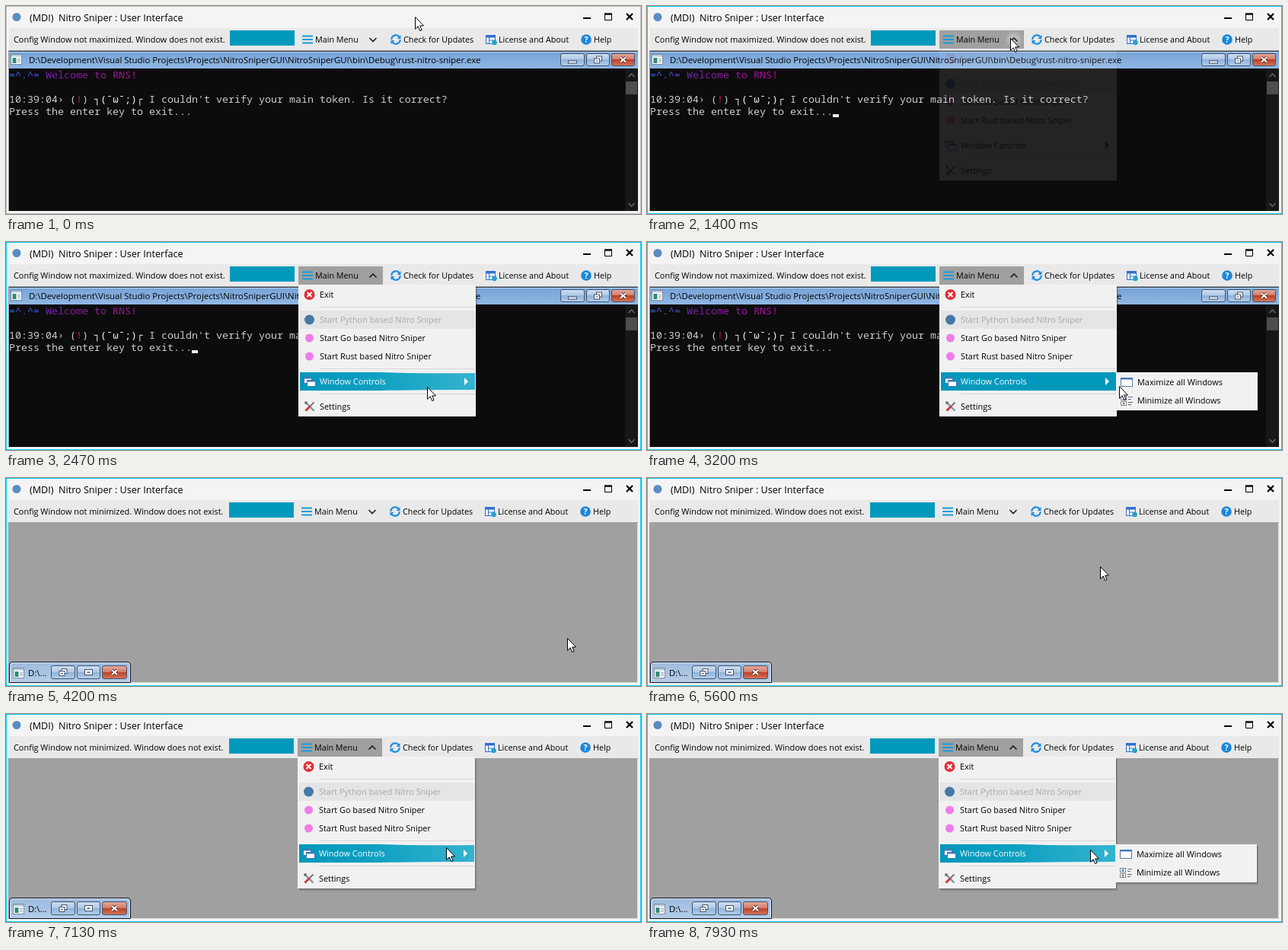
These frames come from a looping animation (834 px wide and 273 px high, 8000 ms). An HTML page:

```html
<!DOCTYPE html>
<html lang="en">
<head>
<meta charset="utf-8">
<title>User Interface</title>
<style>
  html, body { margin: 0; width: 100%; height: 100%; overflow: hidden; background: #fff; }
  svg { display: block; width: 100%; height: 100%; }
  text { font: 10.9px "Open Sans", "Noto Sans", sans-serif; white-space: pre; }
  #tools text { font-size: 10.75px; }
  .title { font-size: 12.6px; }
  .path { font-size: 11.4px; }
  .mono { font: 13.333px "Noto Sans Mono", "DejaVu Sans Mono", monospace; fill: #ccc; }
</style>
</head>
<body>
<svg id="stage" viewBox="0 0 834 273" xmlns="http://www.w3.org/2000/svg">
  <defs>
    <linearGradient id="bar" x2="0" y2="1"><stop stop-color="#76a2d6"/><stop offset="1" stop-color="#92b8e4"/></linearGradient>
    <linearGradient id="mini" x2="0" y2="1"><stop stop-color="#9dbbdf"/><stop offset="1" stop-color="#b4cdea"/></linearGradient>
    <linearGradient id="blueBtn" x2="0" y2="1"><stop stop-color="#cfdff1"/><stop offset=".48" stop-color="#b0c9e6"/><stop offset=".5" stop-color="#8fb1d8"/><stop offset="1" stop-color="#b4d0ee"/></linearGradient>
    <linearGradient id="redBtn" x2="0" y2="1"><stop stop-color="#e6aa9c"/><stop offset=".48" stop-color="#d47b68"/><stop offset=".5" stop-color="#bb3f25"/><stop offset="1" stop-color="#d4785c"/></linearGradient>
    <linearGradient id="sheen"><stop stop-color="#0099bc"/><stop offset=".35" stop-color="#0a9dbf"/><stop offset="1" stop-color="#35b3d0"/></linearGradient>
    <linearGradient id="hello" gradientUnits="userSpaceOnUse" x1="4" x2="172" y1="0" y2="0"><stop stop-color="#2f6bea"/><stop offset=".24" stop-color="#5146dc"/><stop offset=".32" stop-color="#7a1ea8"/><stop offset="1" stop-color="#ab0f98"/></linearGradient>
    <radialGradient id="shine"><stop stop-color="#fff" stop-opacity=".38"/><stop offset=".6" stop-color="#fff" stop-opacity=".22"/><stop offset="1" stop-color="#fff" stop-opacity="0"/></radialGradient>
  </defs>

  <!-- main window -->
  <rect width="834" height="273" fill="#f4f4f4"/>
  <rect x="4" y="29" width="826" height="29" fill="#e9e9e9"/>
  <rect x="3" y="58" width="827" height="211" fill="#a0a0a0"/>
  <path d="M829.5 59V268.500H4" fill="none" stroke="#e3e3e3"/>
  <circle cx="14" cy="14.5" r="5.5" fill="#5b8cc0"/>
  <text class="title" x="31" y="20">(MDI)  Nitro Sniper : User Interface</text>
  <path d="M758 16H768" stroke="#000" stroke-width="2"/>
  <path d="M786.5 10V18.5H795.5V10" fill="none" stroke="#000"/>
  <path d="M786 10.5H796" stroke="#000" stroke-width="2.4"/>
  <path d="M815 10L823 18M823 10L815 18" stroke="#000" stroke-width="2.3"/>

  <!-- toolbar -->
  <text id="note" x="10" y="48"></text>
  <g id="tools">
    <rect x="294" y="32" width="85" height="20" fill="#0099bc"/>
    <rect id="hot" x="384" y="32" width="111" height="24" fill="#a0a0a0"/>
    <circle id="glow" cx="482" cy="44" r="12" fill="url(#shine)"/>
    <path d="M389 39.5H403M389 44H403M389 48.5H403" stroke="#1c9bd8" stroke-width="2"/>
    <text x="406" y="48">Main Menu</text>
    <path id="chev" fill="none" stroke="#222" stroke-width="1.7"/>
    <path d="M506.3 44A5.7 5.7 0 0 1 516.500 40.500M517.700 44A5.7 5.7 0 0 1 507.500 47.500" fill="none" stroke="#1f8fe0" stroke-width="2.2"/>
    <path d="M518.5 38V43H513.500ZM505.500 50V45H510.500Z" fill="#1f8fe0"/>
    <text x="522" y="48">Check for Updates</text>
    <rect x="630.5" y="38.5" width="12" height="11" fill="#fff" stroke="#2f6fd0"/>
    <path d="M630 40H643" stroke="#2f6fd0" stroke-width="3"/>
    <path d="M634.5 41V49M634 45H642" stroke="#2f6fd0"/>
    <circle cx="641.5" cy="48" r="3.3" fill="#25a2c8"/>
    <text x="647" y="48">License and About</text>
    <circle cx="762" cy="44" r="6.8" fill="#1b87da"/>
    <text x="759.5" y="48" style="font-weight:700;fill:#fff">?</text>
    <text x="772" y="48">Help</text>
  </g>

  <!-- console window -->
  <g id="shell">
    <rect x="4" y="59" width="826" height="24" fill="url(#bar)"/>
    <path d="M4 59.5H830" stroke="#29384a"/>
    <path d="M4 60.5H830" stroke="#b9d5f0"/>
    <g class="appIcon" transform="translate(6 63)"></g>
    <text class="path" x="30" y="75">D:\Development\Visual Studio Projects\Projects\NitroSniperGUI\NitroSniperGUI\bin\Debug\rust-nitro-sniper.exe</text>
    <g id="shellBtns"></g>
    <rect x="4" y="82" width="826" height="187" fill="#0c0c0c"/>
    <rect x="813" y="82" width="17" height="187" fill="#171717"/>
    <rect x="814" y="99" width="15" height="17" fill="#4d4d4d"/>
    <path d="M817.5 93L821.5 89L825.5 93M817.5 259L821.5 263L825.5 259" fill="none" stroke="#686868" stroke-width="1.5"/>
    <text class="mono" x="4" y="95" style="fill:url(#hello)">=^.^= Welcome to RNS!</text>
    <text class="mono" x="4" y="127">10:39:04› (</text>
    <text class="mono" x="92" y="127" style="fill:#b5184a">!</text>
    <text class="mono" x="100" y="127">)</text>
    <text class="mono" x="116" y="127" style="fill:#f2f2f2">┐(¯ω¯;)┌</text>
    <text class="mono" x="188" y="127">I couldn't verify your main token. Is it correct?</text>
    <text class="mono" x="4" y="143">Press the enter key to exit...</text>
    <rect id="caret" x="244" y="142" width="8" height="4" fill="#f2f2f2"/>
  </g>

  <!-- minimized console -->
  <g id="mini-win">
    <path d="M4.5 268.5V246Q4.5 241.5 9 241.5H159Q163.5 241.5 163.5 246V268.5Z" fill="url(#mini)" stroke="#10151c"/>
    <path d="M5.5 268V246.5Q5.5 242.5 9.5 242.5H158.5Q162.5 242.5 162.5 246.5V268" fill="none" stroke="#eef6fd" stroke-opacity=".8"/>
    <g class="appIcon" transform="translate(9 249)"></g>
    <text class="path" x="29" y="260">D:\...</text>
    <g id="miniBtns"></g>
  </g>

  <g id="menus">
    <g id="menu">
      <rect x="386" y="59" width="233" height="173" fill="#000" opacity=".14"/>
      <rect x="385" y="58" width="233" height="172" fill="#000" opacity=".22"/>
      <rect x="384" y="56" width="233" height="173" fill="#f1f1f1"/>
      <path d="M412 85.5H616M412 166.5H616M412 199.5H616" stroke="#d6d6d6"/>
      <rect x="386" y="90" width="230" height="24" fill="#e5e5e5"/>
      <g id="rows"></g>
    </g>
    <g id="sub">
      <rect x="619" y="173" width="185" height="51" fill="#000" opacity=".14"/>
      <rect x="618" y="172" width="185" height="50" fill="#000" opacity=".22"/>
      <rect x="617" y="171" width="185" height="50" fill="#f1f1f1"/>
      <g id="subRows"></g>
    </g>
  </g>

  <rect id="frame" x=".5" y=".5" width="833" height="272" fill="none"/>
  <path id="mouse" d="M.5 .5V16.3L4.2 12.8L6.7 18.5L9.1 17.5L6.7 11.9H11.5Z" fill="#fff" stroke="#000"/>
</svg>

<script>
const $ = id => document.getElementById(id);
const show = (el, on) => el.setAttribute('visibility', on ? 'visible' : 'hidden');

// caption buttons
const marks = {
  min: (x, y) => `<rect x="${x - 5.5}" y="${y + 1.5}" width="11" height="3" fill="#fff" stroke="#43536a"/>`,
  max: (x, y) => `<rect x="${x - 5}" y="${y - 3.5}" width="10" height="7" fill="#fff" stroke="#43536a"/><rect x="${x - 2}" y="${y - 1}" width="4" height="2" fill="#5f7ea4"/>`,
  restore: (x, y) => `<g fill="#fff" stroke="#43536a"><rect x="${x - 2}" y="${y - 4.5}" width="7" height="6"/><rect x="${x - 5}" y="${y - 1.5}" width="7" height="6"/></g><path d="M${x - 3} ${y + 1.5}h3" stroke="#43536a"/>`,
  close: (x, y) => [['#5a2a24', 4], ['#fff', 2.2]].map(([c, w]) =>
    `<path d="M${x - 3.5} ${y - 3}L${x + 3.5} ${y + 3}M${x + 3.5} ${y - 3}L${x - 3.5} ${y + 3}" stroke="${c}" stroke-width="${w}"/>`).join('')
};
const caption = (x, y, w, h, kind) =>
  `<rect x="${x + .5}" y="${y + .5}" width="${w - 1}" height="${h - 1}" rx="2.5" fill="url(#${kind === 'close' ? 'redBtn' : 'blueBtn'})" stroke="#41546e"/>` +
  marks[kind](x + w / 2, y + h / 2);

$('shellBtns').innerHTML = caption(728, 62, 32, 17, 'min') + caption(762, 62, 31, 17, 'restore') + caption(795, 62, 31, 17, 'close');
$('miniBtns').innerHTML = caption(59, 246, 32, 18, 'restore') + caption(93, 246, 31, 18, 'max') + caption(126, 246, 33, 18, 'close');
document.querySelectorAll('.appIcon').forEach(g => g.innerHTML =
  '<rect x=".5" y=".5" width="14" height="13" fill="#fff" stroke="#7c8b99"/><rect x="1" y="1" width="13" height="2.5" fill="#b6cde0"/>' +
  '<rect x="2.5" y="5" width="5" height="7" fill="#2f8a78"/><path d="M9 6.5H13M9 8.5H13M9 10.5H13" stroke="#9aa7b2"/>');

// menu rows: label, centre y, icon
const dot = (y, c, r) => `<circle cx="398.5" cy="${y}" r="${r}" fill="${c}"/>`;
const rows = [
  ['Exit', 69, dot(69, '#e02f3a', 7) + '<path d="M395.5 66L401.5 72M401.5 66L395.5 72" stroke="#fff" stroke-width="2"/>'],
  ['Start Python based Nitro Sniper', 102, dot(102, '#4479a8', 6.5)],
  ['Start Go based Nitro Sniper', 126, dot(126, '#f27bea', 5.5)],
  ['Start Rust based Nitro Sniper', 150, dot(150, '#f27bea', 5.5)],
  ['Window Controls', 183, '<g fill="#fff" stroke="#3f79b5"><rect x="391.5" y="177.5" width="10" height="8"/><rect x="395.5" y="181.5" width="11" height="8"/></g><path d="M391 178.5H402M395 182.5H407" stroke="#3f79b5" stroke-width="2"/>'],
  ['Settings', 216, '<path d="M394 211L404.5 221.5" stroke="#8b8f95" stroke-width="2.4"/><path d="M404.5 210.5L399 216" stroke="#777" stroke-width="2"/><path d="M399 216L393.5 221.5" stroke="#cf3a3a" stroke-width="3"/><circle cx="394" cy="211" r="2" fill="#777"/>']
];
const subRows = [
  ['Maximize all Windows', 184, '<rect x="622.5" y="178.5" width="15" height="11" fill="#fff" stroke="#5c7896"/><path d="M622 179.5H638" stroke="#3b7cc4" stroke-width="2"/>'],
  ['Minimize all Windows', 208, '<g fill="#fff" stroke="#7b8794"><rect x="622.5" y="202.5" width="7" height="5"/><rect x="622.5" y="209.5" width="7" height="5"/></g><circle cx="626" cy="205" r="1.5" fill="#3b7cc4"/><circle cx="626" cy="212" r="1.5" fill="#a2703a"/><path d="M632 203.5H638M632 206.5H636M632 210.5H638M632 213.5H636" stroke="#667"/>']
];
const fillRows = (host, list, x, w, tx) => {
  host.innerHTML = list.map(([label, y, icon]) =>
    `<path class="hl" d="M${x} ${y - 12}h${w}v24h${-w}z" fill="#0099bc"/>${icon}<text x="${tx}" y="${y + 4}">${label}</text>`).join('');
  const bars = host.querySelectorAll('.hl');
  const labels = host.querySelectorAll('text');
  return list.map((_, i) => ({ bar: bars[i], label: labels[i] }));
};
const main = fillRows($('rows'), rows, 386, 230, 412);
const side = fillRows($('subRows'), subRows, 619, 182, 644);
$('rows').insertAdjacentHTML('beforeend', '<path id="more" d="M602 178L607 183L602 188Z"/>');
main[4].bar.insertAdjacentHTML('afterend',
  '<g id="gloss"><path d="M386 171H616V195H386Z" fill="#f1f1f1"/><path d="M386 171H490Q565 173 616 172V194Q560 193.5 490 195H386Z" fill="url(#sheen)"/></g>');

// time runs in ticks, 15 per second
const LOOP = 120;
const legs = [ // first tick, last tick, x, y
  [4, 13, 477, 42], [24, 33, 524, 154], [34, 35, 553, 190], [40, 48, 620, 189],
  [49, 52, 690, 199], [53, 55, 737, 210], [79, 89, 481, 41], [100, 107, 578, 175], [119, 119, 582, 178]
];
const caretOn = [[5, 13], [21, 29], [37, 45], [53, 61]];
const glossOn = [[34, 40], [106, 112], [119, 120]];
const subOn = [[40, 61], [112, 120]];
const fade = [[0, 0], [21, .1], [22, .55], [23, 1], [61, 0], [92, .1], [93, .55], [94, .85], [95, .96], [96, 1]];

const within = (n, spans) => spans.some(([a, b]) => n >= a && n < b);
const held = (n, table) => table.reduce((v, [t, next]) => n >= t ? next : v, 0);

function pointer(n) {
  let x = 537, y = 14;
  for (const [a, b, nx, ny] of legs) {
    if (n < a) break;
    const p = Math.min(1, (n - a + 1) / (b - a + 1));
    const e = b - a > 5 ? p * (.6 + p * (1.2 - .8 * p)) : p;
    x += (nx - x) * e;
    y += (ny - y) * e;
  }
  return [Math.round(x), Math.round(y)];
}

function paint(row, on) {
  show(row.bar, on);
  row.label.setAttribute('fill', on ? '#fff' : '#000');
}

function draw(n) {
  const [x, y] = pointer(n);
  const alpha = held(n, fade);
  const open = alpha > 0;
  const sub = within(n, subOn);
  const small = n >= 62;
  const renamed = n >= 63;
  const gloss = within(n, glossOn);
  const over = x >= 384 && x < 495 && y >= 32 && y < 56;

  $('mouse').setAttribute('transform', `translate(${x} ${y})`);
  $('frame').setAttribute('stroke', n < 21 ? '#bdbdbd' : '#00cdf5');
  $('note').textContent = `Config Window not ${renamed ? 'minimized' : 'maximized'}. Window does not exist.`;
  const shift = `translate(${renamed ? -1 : 0} 0)`;
  $('tools').setAttribute('transform', shift);
  $('menus').setAttribute('transform', shift);

  show($('hot'), open || over);
  show($('glow'), over && x > 468);
  $('chev').setAttribute('d', open ? 'M477.5 46.5L482 42L486.5 46.5' : 'M477.5 42L482 46.5L486.5 42');
  $('shell').style.display = small ? 'none' : '';
  $('mini-win').style.display = small ? '' : 'none';
  show($('caret'), within(n, caretOn));

  $('menus').style.display = open ? '' : 'none';
  $('menu').setAttribute('opacity', alpha);
  $('sub').style.display = sub ? '' : 'none';
  const hit = rows.findIndex(r => x >= 386 && x < 616 && Math.abs(y - r[1]) <= 12);
  const lit = sub || gloss ? 4 : hit;
  main.forEach((row, i) => paint(row, i === lit && i !== 1));
  main[1].label.setAttribute('fill', '#a8a8a8');
  $('more').setAttribute('fill', lit === 4 ? '#fff' : '#222');
  show($('gloss'), gloss);
  side.forEach((row, i) => paint(row, sub && x > 622 && Math.abs(y - subRows[i][1]) < 12));
}

const start = performance.now();
function tick(now) {
  const t = Math.max(0, now - start) % 8000;
  draw(Math.floor(t * .015 + .06) % LOOP);
  requestAnimationFrame(tick);
}
draw(0);
requestAnimationFrame(tick);
</script>
</body>
</html>
```
